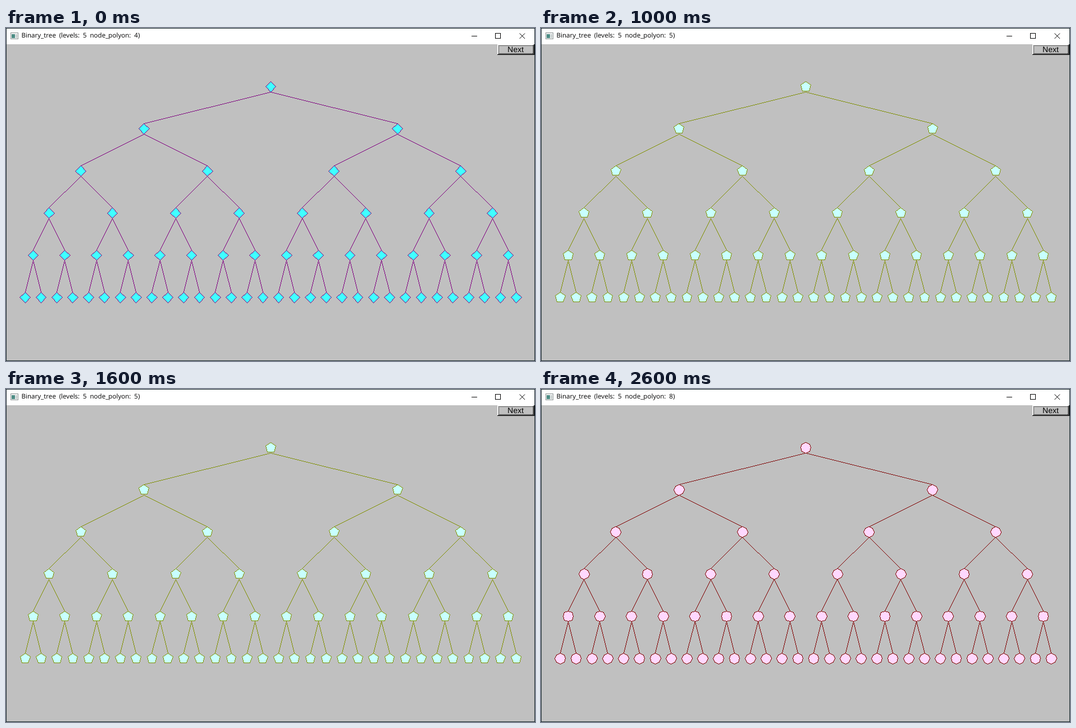
Animation of 942x594 px, one loop 3000 ms. Source, as an HTML page with a canvas:

```html
<!DOCTYPE html>
<html lang="en">
<head>
<meta charset="utf-8">
<title>Binary tree</title>
<style>
  html, body { margin: 0; width: 942px; height: 594px; overflow: hidden; background: #c0c0c0; }
  canvas { display: block; position: absolute; left: 0; top: 0; }
  .text { position: absolute; white-space: pre; color: #000; text-rendering: geometricPrecision; }
  #title { left: 27.5px; top: 6px; font: 11.6px/16px "Open Sans", "Noto Sans", sans-serif; word-spacing: 2.8px; }
  #next { left: 875px; top: 30px; width: 65px; text-align: center; font: 14px/17px "Liberation Sans", Arial, sans-serif; }
</style>
</head>
<body>
<canvas id="stage" width="942" height="594"></canvas>
<div id="title" class="text"></div>
<div id="next" class="text">Next</div>
<script>
const ctx = document.getElementById("stage").getContext("2d");
const title = document.getElementById("title");

const LEVELS = 5, STEP = 75.2, RADIUS = STEP / 8, HOLD = 1000;
const STATES = [
  { sides: 4, line: "#800080", fill: "#40ffff" },
  { sides: 5, line: "#809000", fill: "#c8ffff" },
  { sides: 8, line: "#800000", fill: "#ffd8ff" }
];

function rect(x, y, w, h, color) {
  ctx.fillStyle = color;
  ctx.fillRect(x, y, w, h);
}

// One-pixel line without smoothing.
function line(x0, y0, x1, y1, color) {
  x0 = Math.round(x0); y0 = Math.round(y0);
  x1 = Math.round(x1); y1 = Math.round(y1);
  const n = Math.max(Math.abs(x1 - x0), Math.abs(y1 - y0));
  ctx.fillStyle = color;
  for (let i = 0; i <= n; i++) {
    const k = n ? i / n : 0;
    ctx.fillRect(Math.round(x0 + (x1 - x0) * k), Math.round(y0 + (y1 - y0) * k), 1, 1);
  }
}

function polygon(x, y, state) {
  const points = Array.from({ length: state.sides }, (_, i) => {
    const a = i * 2 * Math.PI / state.sides;
    return [Math.round(x + RADIUS * Math.sin(a)), Math.round(y - RADIUS * Math.cos(a))];
  });
  ctx.fillStyle = state.fill;
  ctx.beginPath();
  points.forEach(([px, py]) => ctx.lineTo(px + 0.5, py + 0.5));
  ctx.fill();
  points.forEach((p, i) => line(...p, ...points[(i + 1) % points.length], state.line));
}

function tree(x, y, spread, depth, state) {
  polygon(x, y, state);
  if (!depth) return;
  for (const side of [-1, 1]) {
    const cx = x + side * spread;
    line(x, y + RADIUS, cx, y + STEP - RADIUS, state.line);
    tree(cx, y + STEP, spread / 2, depth - 1, state);
  }
}

function frame(x, y, w, h, light, dark) {
  rect(x, y, w, 1, light);
  rect(x, y, 1, h, light);
  rect(x, y + h - 1, w, 1, dark);
  rect(x + w - 1, y, 1, h, dark);
}

function chrome() {
  rect(0, 0, 942, 594, "#c0c0c0");
  rect(0, 0, 942, 29, "#fff");
  frame(0, 0, 942, 594, "#18282c", "#18282c");

  // Window icon
  rect(8, 8, 14, 12, "#8c9494");
  rect(9, 9, 12, 10, "#f4f4f4");
  rect(10, 11, 6, 7, "#4c8c84");
  rect(17, 11, 3, 7, "#c8d0d0");

  // Window controls
  rect(829, 14, 10, 1, "#000");
  frame(871, 9, 10, 10, "#000", "#000");
  ctx.strokeStyle = "#000";
  ctx.lineWidth = 1;
  ctx.beginPath();
  ctx.moveTo(914.5, 9.5); ctx.lineTo(924, 19);
  ctx.moveTo(924, 9.5); ctx.lineTo(914.5, 19);
  ctx.stroke();

  // Push button
  frame(875, 29, 66, 19, "#fff", "#000");
  frame(876, 30, 64, 17, "#e0e0e0", "#606060");
  for (let x = 877; x < 939; x += 2) {
    rect(x, 31, 1, 1, "#000");
    rect(x, 45, 1, 1, "#000");
  }
  for (let y = 31; y < 46; y += 2) {
    rect(877, y, 1, 1, "#000");
    rect(938, y, 1, 1, "#000");
  }
}

let shown = -1;
function tick() {
  const index = Math.floor(performance.now() / HOLD) % STATES.length;
  if (index !== shown) {
    shown = index;
    const state = STATES[index];
    chrome();
    tree(471, 29 + STEP, STEP * 3, LEVELS, state);
    title.textContent = `Binary_tree (levels: ${LEVELS} node_polyon: ${state.sides})`;
  }
  requestAnimationFrame(tick);
}
tick();
</script>
</body>
</html>
```
